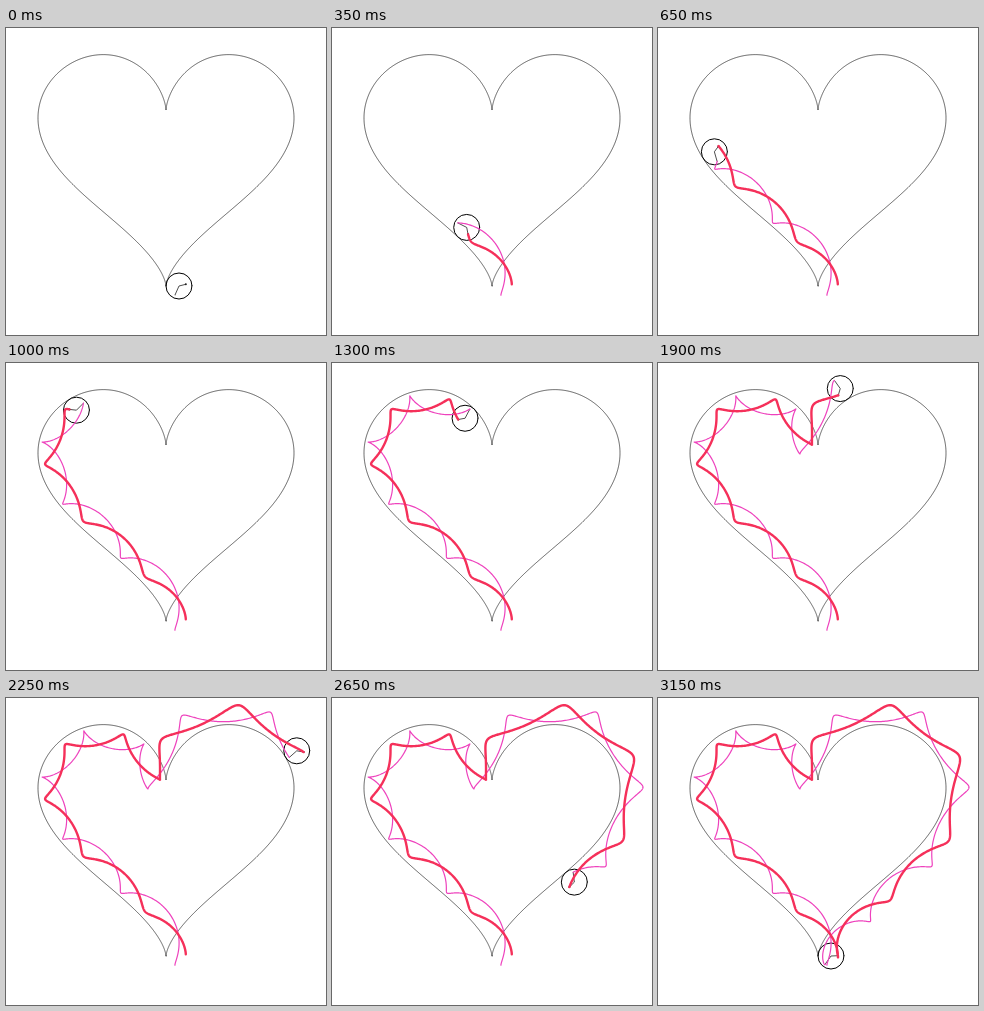
An HTML page with a canvas that plays this animation: 320x307 px, repeating every 3.85 s.

```html
<!DOCTYPE html>
<html lang="en">
<head>
<meta charset="utf-8">
<title>Rolling wheel on a heart</title>
<style>
  html, body { margin: 0; height: 100%; overflow: hidden; background: #fff; }
  canvas { display: block; }
</style>
</head>
<body>
<canvas id="stage" width="320" height="307"></canvas>
<script>
const ctx = document.getElementById('stage').getContext('2d');
const { sin, cos, hypot, min, floor, PI } = Math;

const LOOP = 3850, STEP_MS = 50, STEP = 0.1, FINE = 0.005;
const RADIUS = 13, ROLL = 13.05;
const PENS = [
  { reach: 10, start: 246 * PI / 180, color: '#ee42bd', width: 1.2 },
  { reach: 7, start: 14 * PI / 180, color: '#f5305a', width: 2.4 }
];

// Heart point, wheel centre and path speed; t = 0 is the bottom cusp.
function pose(t) {
  const a = PI + t, s = sin(a), c = cos(a);
  const x = 160 + 128 * s ** 3;
  const y = 122 - 8 * (13 * c - 5 * cos(2 * a) - 2 * cos(3 * a) - cos(4 * a));
  // Velocity divided by sin(a), so the normal stays continuous at the cusps
  const wx = 384 * s * c;
  const wy = 8 * (19 - 4 * c - 24 * c * c - 32 * c ** 3);
  const w = hypot(wx, wy);
  return {
    x, y,
    cx: x + RADIUS * wy / w,
    cy: y - RADIUS * wx / w,
    speed: Math.abs(s) * w
  };
}

const path = [];
let length = 0;
for (let i = 0; i * FINE < 2 * PI + FINE; i++) {
  const t = min(i * FINE, 2 * PI);
  const p = pose(t);
  if (i) length += pose(t - FINE / 2).speed * FINE;
  p.tips = PENS.map(({ reach, start }) => {
    const turn = start + length / ROLL;
    return [p.cx + reach * cos(turn), p.cy - reach * sin(turn)];
  });
  path.push(p);
}
const heart = path.map(p => [p.x, p.y]);

function line(points, color, width) {
  ctx.beginPath();
  points.forEach(([x, y]) => ctx.lineTo(x, y));
  ctx.strokeStyle = color;
  ctx.lineWidth = width;
  ctx.stroke();
}

function draw(ms) {
  const t = min(floor(ms / STEP_MS) * STEP, 2 * PI);
  const last = min(Math.round(t / FINE), path.length - 1);
  const { cx, cy, tips } = path[last];

  ctx.fillStyle = '#fff';
  ctx.fillRect(0, 0, 320, 307);
  ctx.lineCap = ctx.lineJoin = 'round';
  line(heart, '#222', 0.7);

  ctx.beginPath();
  ctx.arc(cx, cy, RADIUS, 0, 2 * PI);
  ctx.strokeStyle = '#000';
  ctx.lineWidth = 1;
  ctx.stroke();

  line([tips[0], [cx, cy], tips[1]], '#222', 0.8);
  ctx.beginPath();
  ctx.arc(...tips[1], 1, 0, 2 * PI);
  ctx.fillStyle = '#222';
  ctx.fill();

  if (last) {
    const trail = path.slice(0, last + 1);
    PENS.forEach((pen, i) => line(trail.map(p => p.tips[i]), pen.color, pen.width));
  }
}

const begin = performance.now();
function tick() {
  draw((performance.now() - begin) % LOOP);
  requestAnimationFrame(tick);
}
tick();
</script>
</body>
</html>
```
